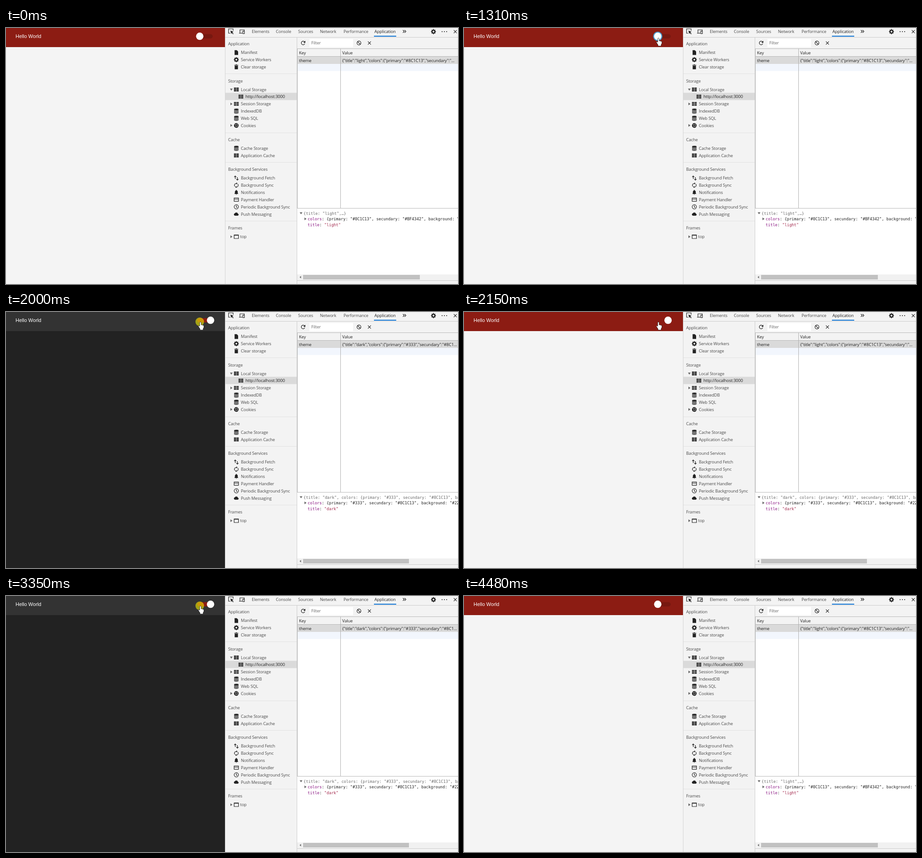
Recreate the animation shown at these times as an HTML page. Size 995 by 563 pixels, loop 4.79 s.

```html
<!DOCTYPE html>
<html lang="en">
<head>
<meta charset="utf-8">
<title>Theme switch</title>
<style>
  html, body { margin: 0; width: 100%; height: 100%; overflow: hidden; background: #f3f3f3; }
  svg { display: block; width: 100vw; height: 100vh; }
  text { font: 9.3px "Open Sans", "Noto Sans", sans-serif; letter-spacing: -.15px; fill: #4a4a4a; white-space: pre; }
  .hello { font: 11px "Liberation Sans", Arial, sans-serif; letter-spacing: 0; fill: #fff; }
  .mono { font: 8.67px "DejaVu Sans Mono", monospace; letter-spacing: 0; fill: #222; }
  .dark { fill: #222; }
  .faint { fill: #6a6a6a; }
  .prop { fill: #881280; }
  .str { fill: #a3284c; }
  .line { fill: none; stroke: #222; stroke-width: 1.2; }
</style>
</head>
<body>
<svg id="stage" viewBox="0 0 995 563"></svg>
<script>
const LOOP = 4790, SLIDE = 250, LAG = 35;
const clicks = [
  { press: 1230, release: 1300, flip: 1345, onHandle: true },
  { press: 2000, release: 2150, flip: 2145 },
  { press: 2790, release: 2935, flip: 2935, onHandle: true },
  { press: 3350, release: 3475, flip: 3475 }
];
// Pointer path: time, x, y
const path = [
  [160, 886, 552], [300, 775, 385], [430, 590, 210], [560, 460, 95], [670, 424, 69], [720, 424, 69],
  [1080, 428, 22], [3490, 428, 22], [3860, 666, 429], [4070, 850, 492], [4250, 982, 532], [4430, 966, 560]
];
const themes = {
  light: {
    head: '#8C1C13', page: '#f4f4f4', off: [119, 24, 16], thumb: 257,
    value: '{"title":"light","colors":{"primary":"#8C1C13","secundary":"...',
    root: '{title: "light",…}',
    colors: '{primary: "#8C1C13", secundary: "#BF4342", background: "#F5F5F5"'
  },
  dark: {
    head: '#333', page: '#222', off: [43, 43, 43], thumb: 233,
    value: '{"title":"dark","colors":{"primary":"#333","secundary":"#8C1...',
    root: '{title: "dark", colors: {primary: "#333", secundary: "#8C1C13", background',
    colors: '{primary: "#333", secundary: "#8C1C13", background: "#222"'
  }
};
const trackOn = [140, 28, 19];

const rect = (x, y, w, h, fill, extra = '') =>
  `<rect x="${x}" y="${y}" width="${w}" height="${h}" fill="${fill}" ${extra}/>`;
const text = (x, mid, s, cls = '', id = '') =>
  `<text x="${x}" y="${mid + 3.3}" class="${cls}" id="${id}">${s}</text>`;
const shape = (x, y, d, cls = 'dark') =>
  `<path transform="translate(${x} ${y})" class="${cls}" d="${d}"/>`;
const right = (x, y) => shape(x, y, 'M-2-3L2.5 0L-2 3Z', 'faint');
const down = (x, y) => shape(x, y, 'M-3-2H3L0 2.5Z', 'faint');

const cross = 'M-3.3-3.3L3.3 3.3M3.3-3.3L-3.3 3.3';
const ring = r => `M${-r} 0a${r} ${r} 0 1 1 ${2 * r} 0a${r} ${r} 0 1 1 ${-2 * r} 0`;
const spokes = Array.from({ length: 8 }, (_, i) => {
  const c = Math.cos(i * Math.PI / 4), s = Math.sin(i * Math.PI / 4);
  return `M${c * 3.4} ${s * 3.4}L${c * 5.4} ${s * 5.4}`;
}).join('');
const gear = (x, y) =>
  `<g fill="none" stroke="#222" stroke-width="2.2">${shape(x, y, ring(3), '')}${shape(x, y, spokes, '')}</g>`;
const cells = [-4.2, -1.2, 1.8].map(y => [-5.2, .4].map(x => `M${x} ${y}h4.9v2.3h-4.9z`).join('')).join('');
const disc = y => `M-5 ${y}q5 2.6 10 0v1.5q-5 2.6-10 0z`;

const icons = {
  file: (x, y) => shape(x, y, 'M-3.8-5.2H1L4-2.2V5.2H-3.8Z'),
  gear,
  trash: (x, y) => shape(x, y, 'M-4.2-4.6H-1.5L-.8-5.4H.8L1.5-4.6H4.2V-3.3H-4.2ZM-3.6-2.5H3.6V5.2H-3.6Z'),
  grid: (x, y) => shape(x, y, cells),
  db: (x, y) => shape(x, y, 'M-5-3.6a5 1.8 0 0 1 10 0a5 1.8 0 0 1-10 0Z' + disc(-2.2) + disc(.3) + disc(2.8)),
  cookie: (x, y) => shape(x, y, ring(5.1)) +
    [[-2, -1.5], [1.6, -2.2], [-.8, 2], [2.4, 1.3]].map(([a, b]) => `<circle cx="${x + a}" cy="${y + b}" r="1" fill="#f3f3f3"/>`).join(''),
  fetch: (x, y) => shape(x, y, 'M-2.4 2V-4.6M-4.8-2.2L-2.4-4.6L0-2.2M2.4-2V4.6M0 2.2L2.4 4.6L4.8 2.2', 'line'),
  sync: (x, y) => shape(x, y, 'M-3.2 2.6A4 4 0 0 1 0-4M3.2-2.6A4 4 0 0 1 0 4', 'line') +
    shape(x, y, 'M0-6L2.6-4L0-1.8ZM0 6L-2.6 4L0 1.8Z'),
  bell: (x, y) => shape(x, y, 'M-4.5 3.3L-3.2 2V-1.2Q-3-4-.8-4.4V-5.4H.8V-4.4Q3-4 3.2-1.2V2L4.5 3.3ZM-1.3 4H1.3Q0 6.3-1.3 4Z'),
  card: (x, y) => shape(x, y, 'M-4.8-3.7H4.8V3.7H-4.8ZM-4.8-1H4.8', 'line'),
  clock: (x, y) => shape(x, y, ring(4.7) + 'M0-3V.3L2.4 1.7', 'line'),
  cloud: (x, y) => shape(x, y, 'M-3 3.6A2.7 2.7 0 0 1-3.3-1.7A3.6 3.6 0 0 1 3.3-.9A2.3 2.3 0 0 1 3.2 3.6Z'),
  frame: (x, y) => shape(x, y, 'M-4.8-4H4.8V4H-4.8ZM-4.8-3H4.8', 'line')
};

const headings = [['Application', 35], ['Storage', 116.5], ['Cache', 245.5], ['Background Services', 311], ['Frames', 440]];
const items = [
  ['file', 'Manifest', 54], ['gear', 'Service Workers', 69.7], ['trash', 'Clear storage', 85.5],
  ['grid', 'Local Storage', 135.3], ['grid', 'http://localhost:3000', 151, 10], ['grid', 'Session Storage', 167],
  ['db', 'IndexedDB', 182.7], ['db', 'Web SQL', 198.5], ['cookie', 'Cookies', 214.3],
  ['db', 'Cache Storage', 264.5], ['grid', 'Application Cache', 280.3],
  ['fetch', 'Background Fetch', 330], ['sync', 'Background Sync', 345.8], ['bell', 'Notifications', 361.6],
  ['card', 'Payment Handler', 377.5], ['clock', 'Periodic Background Sync', 393.3], ['cloud', 'Push Messaging', 409.2],
  ['frame', 'top', 459, 0, -1.5]
];
const tabs = [['Elements', 541], ['Console', 594], ['Sources', 643], ['Network', 691], ['Performance', 743]];

const page = `
  <rect id="page" width="482" height="563"/><rect id="head" width="482" height="42"/>
  ${text(21, 18.7, 'Hello World', 'hello')}
  <rect id="track" x="421" y="13.5" width="34" height="9.5" rx="4.75"/>
  <g id="handle"><circle id="glow" r="9.1" fill="none" stroke="#3bf" stroke-width="2.2"/><circle r="8.1" fill="#fff"/></g>`;

const sidebar = rect(482, 0, 513, 563, '#f3f3f3') + rect(482, 0, 1, 563, '#d4d4d4') +
  rect(483, 142.5, 157, 16, '#dadada') +
  [100, 230, 295, 424].map(y => rect(483, y, 157, 1, '#e2e2e2')).join('') +
  headings.map(([s, y]) => text(489, y, s)).join('') +
  items.map(([icon, s, y, indent = 0, shift = 0]) =>
    icons[icon](507 + indent, y) + text(517 + indent + shift, y, s, indent ? 'dark' : '')).join('') +
  down(496, 135.3) + right(496, 167) + right(496, 214.3) + right(496, 459);

const toolbar = tabs.map(([s, x]) => text(x, 8, s)).join('') + text(811, 8, 'Application', 'dark') +
  rect(482, 20, 513, 1, '#ccc') + rect(810, 17, 49, 2, '#0f74d4') +
  shape(495, 7, 'M5-1V-5H-5V4.5H-1.5', 'line') + shape(495, 7, 'M-1-1.5L6 1.5L3 2.7L6 5.7L4.8 6.8L1.9 3.8L.8 6.3Z') +
  shape(519, 8, 'M-4 2V-4H5.5V-1.5M-6 3.4H1M2.3-1.2H5.8V4.5H2.3Z', 'line') +
  shape(877, 7.5, 'M-3.3-3L-.3 0L-3.3 3M.4-3L3.4 0L.4 3', 'line') + gear(941, 8) +
  [960, 965, 970].map(x => `<circle cx="${x}" cy="8" r="1.1" fill="#222"/>`).join('') + shape(989, 8, cross, 'line');

const table = rect(640, 20, 1, 543, '#ccc') +
  shape(654, 33, 'M3.8-1.5A4 4 0 1 0 3.8 1.4', 'line') + shape(654, 33, 'M5-5V-.5H.5Z') +
  rect(668, 24, 96, 18, '#fff') + text(672, 33, 'Filter', 'faint') +
  shape(777, 33, ring(4.3) + 'M-3-3L3 3', 'line') + shape(800, 33, cross, 'line') +
  rect(641, 45, 354, 1, '#b8b8b8') + rect(641, 62, 354, 334, '#fff') +
  rect(641, 62, 354, 17, '#dadada') + rect(641, 79, 354, 15.5, '#f2f6fd') + rect(641, 62, 354, 1, '#b8b8b8') +
  rect(641, 45, 1, 351, '#b8b8b8') + rect(736, 45, 1, 351, '#b0b0b0') +
  text(645, 55, 'Key', 'dark') + text(740, 55, 'Value', 'dark') +
  text(645, 71.3, 'theme', 'dark') + text(740, 71.3, '', 'dark', 'value');

const details = rect(641, 396, 354, 146, '#fff') + rect(641, 396, 354, 1, '#b8b8b8') +
  down(649.5, 407.3) + right(659, 419.7) +
  text(655, 407.3, '', 'mono faint', 'root') +
  text(664, 420, '<tspan class="prop">colors</tspan>: <tspan id="colors"></tspan>', 'mono') +
  text(664, 432.7, '<tspan class="prop">title</tspan>: <tspan class="str" id="title"></tspan>', 'mono') +
  rect(641, 542, 354, 13, '#f1f1f1') + rect(654, 543, 257, 10, '#c1c1c1', 'id="thumb"') +
  shape(648, 548, 'M1.5-2.7L-1.7 0L1.5 2.7Z', 'faint') + rect(641, 555, 354, 1, '#ccc');

const pointer = `
  <circle id="press" cx="426.5" cy="21.5" r="9.5" fill="#ff0" opacity=".55"/>
  <g id="cursor" fill="#fff" stroke="#000" stroke-width=".6" stroke-linejoin="round">
    <path id="arrow" d="M0 0V12.5L2.9 9.9L4.8 14.3L6.9 13.4L5 9.2H9Z"/>
    <path id="hand" transform="scale(1.05)" d="M-1.5 9V1.3a1.5 1.3 0 0 1 3 0V6.2a1.2 1.2 0 0 1 2.1.5a1.2 1.2 0 0 1 2 .5a1 1 0 0 1 1.6.9V11.5L5.6 14V16.8H-.8V14.5L-4 9.6a1.1 1.1 0 0 1 1.7-1.4Z"/>
  </g>`;

const $ = id => document.getElementById(id);
$('stage').innerHTML = page + sidebar + toolbar + table + details + pointer;

const clamp = v => Math.max(0, Math.min(1, v));
const set = (id, attrs) => Object.entries(attrs).forEach(([k, v]) => $(id).setAttribute(k, v));
const show = (id, on) => set(id, { visibility: on ? 'visible' : 'hidden' });
const write = (id, s) => { if ($(id).textContent !== s) $(id).textContent = s; };
const themeAt = t => clicks.filter(c => t >= c.flip).length % 2 ? 'dark' : 'light';

function pointerAt(t) {
  const i = path.findIndex(p => p[0] > t);
  if (i < 0) return path[path.length - 1].slice(1);
  if (!i) return path[0].slice(1);
  const [t0, x0, y0] = path[i - 1], [t1, x1, y1] = path[i], p = (t - t0) / (t1 - t0);
  return [x0 + (x1 - x0) * p, y0 + (y1 - y0) * p];
}

function slideAt(t) {
  const last = clicks.filter(c => t >= c.flip).pop();
  if (!last) return 0;
  const eased = 1 - (1 - clamp((t - last.flip) / SLIDE)) ** 2;
  return themeAt(t) === 'dark' ? eased : 1 - eased;
}

function draw(now) {
  const t = now % LOOP;
  const theme = themes[themeAt(t)], lagName = themeAt(t - LAG), lagged = themes[lagName];
  const slide = slideAt(t);

  set('page', { fill: theme.page });
  set('head', { fill: theme.head });
  set('track', { fill: `rgb(${theme.off.map((c, i) => c + (trackOn[i] - c) * slide)})` });
  set('handle', { transform: `translate(${426.5 + 23.8 * slide} 18.2)` });
  const glow = clicks.filter(c => c.onHandle).map(c =>
    Math.min(clamp((t - c.press) / 100), 1 - clamp((t - c.release) / 150)));
  set('glow', { opacity: Math.max(...glow) });

  write('value', theme.value);
  write('root', lagged.root);
  write('colors', lagged.colors);
  write('title', `"${lagName}"`);
  set('thumb', { width: lagged.thumb });

  const [x, y] = pointerAt(t);
  const visible = t >= 160 && t < 4480, overSwitch = x < 458 && y < 28;
  set('cursor', { transform: `translate(${x} ${y})` });
  show('arrow', visible && !overSwitch);
  show('hand', visible && overSwitch);
  show('press', clicks.some(c => t >= c.press && t < c.release));
}

const start = performance.now();
function tick() {
  draw(performance.now() - start);
  requestAnimationFrame(tick);
}
tick();
</script>
</body>
</html>
```
